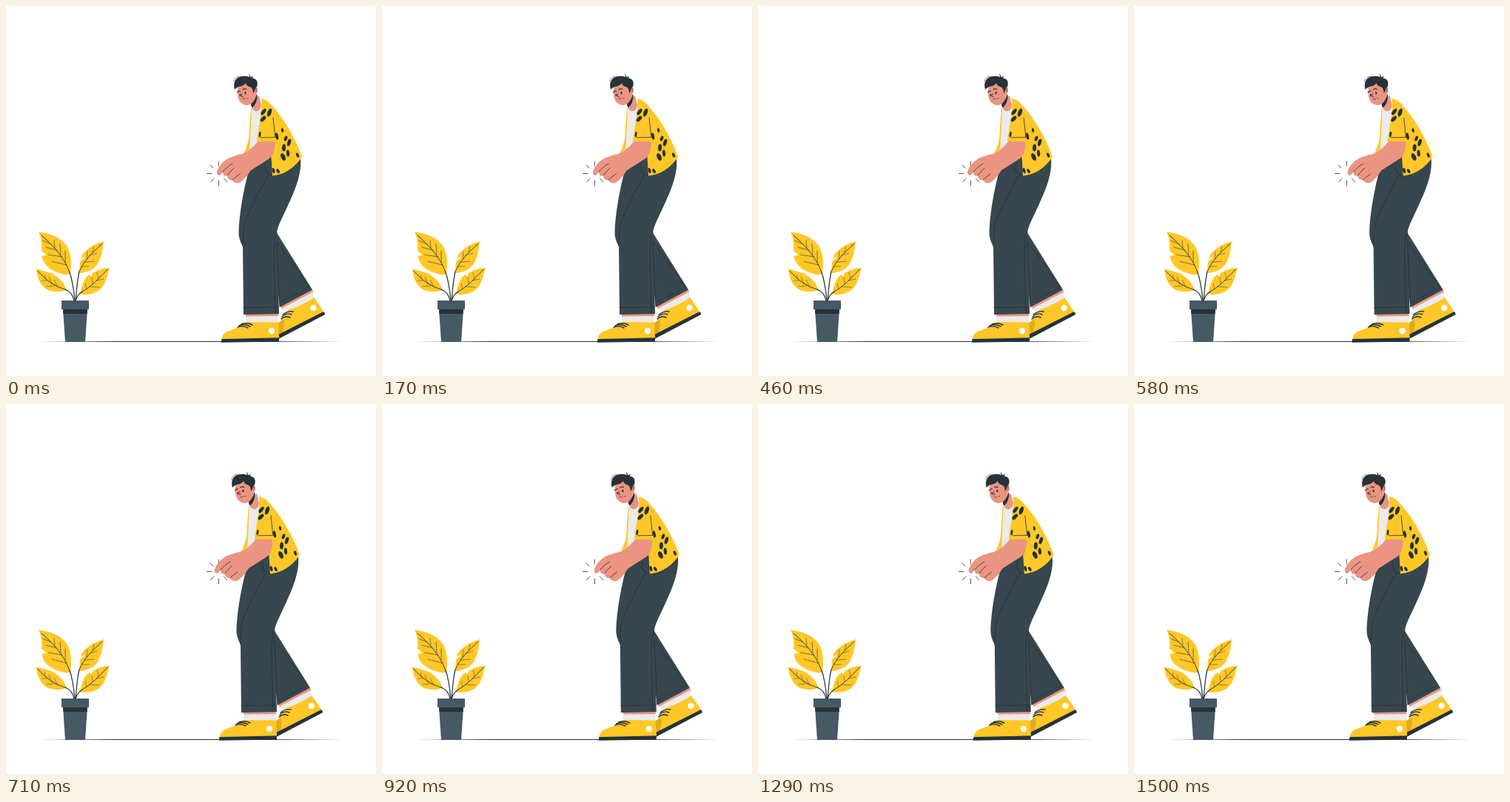
An HTML page with a canvas for the animation above (1540 ms loop, 500 by 500 pixels).

```html
<!DOCTYPE html>
<html lang="en">
<head>
<meta charset="utf-8">
<title>Shaking man and plant</title>
<style>
  html, body { margin: 0; width: 100%; height: 100%; overflow: hidden; background: #fff; }
  canvas { display: block; width: 100vw; height: 100vh; }
</style>
</head>
<body>
<canvas id="stage" width="500" height="500"></canvas>
<script>
const ctx = document.getElementById('stage').getContext('2d');
const LOOP = 1540, FPS = 24, SHAKE_FRAMES = 36, PHASE = 0.018;
const YELLOW = '#ffc727', DARK = '#263238', PANTS = '#37474f';
const POT = '#455a64', SKIN = '#eb9481', LIGHT = '#ebebeb';

// Horizontal offsets at each tenth of the shake.
const SHAKE = [0, -1, 2, -4, 4, -4, 4, -4, 2, -1, 0];

function shakeAt(progress) {
  const p = (progress % 1) * 10, i = Math.floor(p);
  return SHAKE[i] + (SHAKE[i + 1] - SHAKE[i]) * (p - i);
}

function fill(color, d) {
  ctx.fillStyle = color;
  ctx.fill(new Path2D(d));
}

function line(d, width = 0.8, color = DARK) {
  ctx.strokeStyle = color;
  ctx.lineWidth = width;
  ctx.stroke(new Path2D(d));
}

function spot(x, y, rx, ry, degrees = 0, color = DARK) {
  ctx.fillStyle = color;
  ctx.beginPath();
  ctx.ellipse(x, y, rx, ry, degrees * Math.PI / 180, 0, 7);
  ctx.fill();
}

function drawGround() {
  fill(DARK, 'M45 453.5L150 453H350L455 453.5L350 454H150Z');
}

function drawPlant() {
  fill(YELLOW, 'M44 305C58 307 74 312 82 324C88 333 89 348 87 363C77 364 61 359 53 349C50 345 49 341 48.5 338L55 336L48 331C49 322 48 314 44 305Z');
  fill(YELLOW, 'M132 318C116 323 104 331 101 341L108 339L100 345L99 361C112 360 123 354 127 342C130 334 131 327 132 318Z');
  fill(YELLOW, 'M41 355C42 368 47 379 57 384C66 387 76 386 82 384C79 375 72 366 61 361C54 358 47 358 41 355Z');
  fill(YELLOW, 'M140 354C131 354 123 357 117 361L115.5 366L113 363C105 367 102 379 100 389.5C113 391 125 388 132 377C136 370 137 362 140 354Z');
  line('M86 360C91 374 92 388 93 399M99 359C96 372 95 386 94 399M80 383C88 386 91 392 92 399M103 386C98 389 95 394 94 399', 1.2);
  line('M48 310C62 322 78 338 86 360M130 321C117 333 105 344 99 359M43 358C53 370 66 379 80 383M137 356C127 367 115 379 103 386', 0.9);
  line('M61 322L50 317M69 330L54 326M76 339L57 336M82 350L62 345M66 327L65 317M74 336L73 322M80 346L80 331', 0.6);
  line('M117 333L119 325M109 342L110 332M113 337L123 334M106 346L119 345M103 352L112 352M54 369L52 363M62 376L58 366M70 380L65 370M56 371L48 371M66 378L55 379M125 368L123 360M117 375L116 367M122 371L132 369M113 379L126 380M109 382L107 375', 0.5);
  fill(POT, 'M77 410H110L107 454H80Z');
  fill(DARK, 'M77 410H110L109.5 416H77.5Z');
  fill(POT, 'M75 398H112V410H75Z');
}

function drawSparks() {
  line('M287.3 210V216M276 215L280 219M271.5 226.5H278M276.5 238L281 233M287.5 236V243M294.5 233L299 238', 0.8);
}

function drawShoes() {
  fill(SKIN, 'M370 405L414 383L415 388L374 410Z');
  fill(LIGHT, 'M374 408L414 387L417 395L379 416Z');
  fill(YELLOW, 'M369 428C376 421 379 414 383 410C396 406 407 400 416 394C421 400 425 407 429 413L368 446Z');
  fill('#dfac1b', 'M368 428L375 424L376 430L374 441L368 445Z');
  fill(DARK, 'M368 444L429 413Q431 414 431 417L369 449.5Z');
  line('M374 417C379 413 384 412 388 413M373 420C377 416 382 415 386 417M372 423C376 419 380 419 384 421', 1.4);
  spot(415.5, 408, 4.2, 4.2, 0, '#fff');

  fill(SKIN, 'M324 415H368V420H324Z');
  fill(LIGHT, 'M324 419.5L368 419V429H324Z');
  fill(YELLOW, 'M292 450C292 443 297 440 304 438C313 435 320 431 325 427L368 427.5L369 449Z');
  fill(DARK, 'M291.5 450L369 448.3V453.4L291 454.8Q291 452 291.5 450Z');
  line('M318 430C323 428 329 429 333 431M315 432C320 430 326 431 330 433M313 434C318 432 323 433 327 435', 1.4);
  spot(359, 439, 4.2, 4.2, 0, '#fff');
}

function drawPants() {
  fill(PANTS, 'M365 305L414 383.5L370 407L360 320Z');
  line('M367 320L410 379M371 401L410 380', 0.7);
  fill(PANTS, 'M329 218L358 200L398 207C400 225 391 248 383 265C376 281 367 297 366 306L367 340L369 416L321 417L320 325C316 318 314 311 314.5 304C315.5 280 320.5 250 329 218Z');
  line('M354 229C341 252 330 274 324 289C320 300 321 313 320 325M366 306C363 312 362 322 362 338L364 415M366 319L370 406M321 407.5L368 407', 0.9);
  line('M350 213C349 222 353 228 361 230M345 217L356 229M358 206L361 230', 0.8);
}

function drawShirt() {
  fill(YELLOW, 'M331 137L333 140L330 193L321 200C325 190 328 184 328.5 174C329 160 330 150 331 137Z');
  fill(LIGHT, 'M332 137L345 134L349 160L341 184L329 194C330.5 178 331 156 332 137Z');
  fill(YELLOW, 'M345 125C351 126 355 129 359 134C369 145 378 158 385 171C391 182 397 195 400 204C390 219 376 228 360 229.5L357 183L339 182C341 165 347 140 345 125Z');
  const spots = [
    [356, 144, 2.6, 5.8, 20], [348, 143, 2.3, 5, 38], [347.5, 152.5, 2.5, 4.8, 45],
    [343, 173.5, 1.4, 3.8, 8], [373.5, 168, 1.6, 3, -10], [366, 176, 1.9, 4.7, -12],
    [378, 179, 2, 3.7, 20], [382.5, 184.5, 2.3, 5, 18], [375.5, 191.5, 2.5, 4.8, 3],
    [381, 199, 2.1, 4.5, -5], [374.5, 204, 2.9, 5.3, -25], [394, 201.5, 1.8, 3.3, -20],
    [361.5, 222.5, 1.8, 3.7, -15], [367.5, 223, 1.8, 3.2, -30]
  ];
  spots.forEach(s => spot(...s));
  line('M361 151L364 179', 0.8);
}

function drawArm() {
  fill(SKIN, 'M341 182H363C364 193 362 201 356 206L331 222C326 229 321 236 315 239C310 240 307 238 306 235C302 236 299 233 299 229C295 231 293 228 293 224L290 228C287 230 284.5 228 285 224C287 217 293 210 300 206C305 204 312 201 319 200C328 196 335 190 341 182Z');
  line('M306 213C301 216 296 220 293 224M308 219C304 223 301 226 299 229M316 227C312 230 309 232 306 235', 0.8);
  fill(YELLOW, 'M340 178H365L364.5 183H339Z');
  line('M344 177.8L363 177.5', 0.8);
}

function drawHead() {
  fill(SKIN, 'M331 128L342 121L345 134C344 140 341 143 337 142C334 141 332 138 332 134Z');
  fill(SKIN, 'M313 110L325 102L337 109C341 109 341 117 338 119C336 128 332 134 325 134C317 133 313 127 313 118Z');
  fill(DARK, 'M338.5 119C337 126 334 130 331 132.5C331 135 332 137 333 137C337 134 339.5 128 339.5 121Z');
  fill(DARK, 'M309 113C306 103 311 95 320 95C324 94.5 327 95 329 96.3L328 91L331 96.5L334 94L333 97.4C339 98 341 103 339 109C338 110 336 111 336 115L334 118C334 114 333 110 329 109C326 108 325 107 324 104C321 110 313 107 309 113Z');
  line('M308 102C308 98 311 96 315 95M336 113L338 111L338 116', 0.6);
  spot(316.5, 120.5, 1, 1.7, -10);
  spot(323.5, 117.5, 1.1, 1.9, -10);
  line('M312.5 117C313 115.4 315 114.6 316.5 115M320 113C321 111.5 323 111.5 324.5 112.6', 1.2);
  line('M319 118C319 120 317.5 122 319 123L320.5 122.5M319.5 125.5C321 126.3 322.5 126 323.5 125M325.5 125L327 124.5', 0.7);
}

function render(now) {
  const frame = Math.floor((now % LOOP + 5) * FPS / 1000);
  const shift = shakeAt(frame / SHAKE_FRAMES + PHASE) - shakeAt(PHASE);
  ctx.fillStyle = '#fff';
  ctx.fillRect(0, 0, 500, 500);
  ctx.lineCap = ctx.lineJoin = 'round';
  drawGround();
  drawPlant();
  drawSparks();
  ctx.save();
  ctx.translate(shift, 0);
  drawShoes();
  drawPants();
  drawShirt();
  drawArm();
  drawHead();
  ctx.restore();
}

let start;
function tick(now) {
  start ??= now;
  render(now - start);
  requestAnimationFrame(tick);
}
render(0);
requestAnimationFrame(tick);
</script>
</body>
</html>
```
